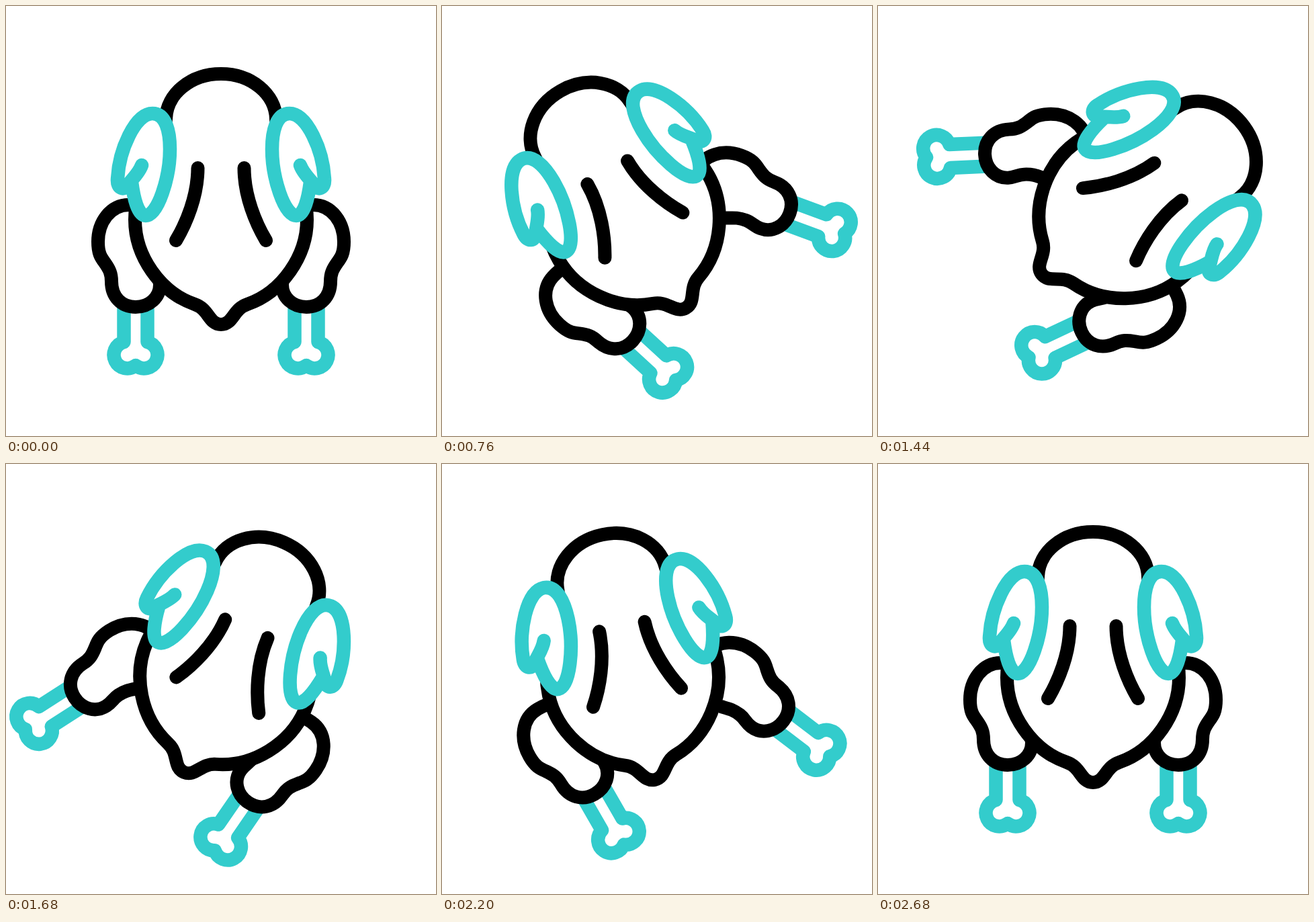
Recreate the animation shown at these times as an HTML page. Size 640 px wide and 640 px high, loop 3 s.

```html
<!DOCTYPE html>
<html lang="en">
<head>
<meta charset="utf-8">
<title>Dancing chicken</title>
<style>
  html, body { margin: 0; width: 100%; height: 100%; overflow: hidden; background: #fff; }
  svg { display: block; width: 100vw; height: 100vh; }
  path { fill: #fff; stroke: #000; stroke-width: 20; stroke-linecap: round; stroke-linejoin: round; }
  .teal { stroke: #33cccc; stroke-width: 20.5; }
  .line { fill: none; }
</style>
</head>
<body>
<svg viewBox="0 0 640 640">
  <defs>
    <g id="leg">
      <path class="teal" d="M175.5 445V500A20 20 0 1 0 193 535A20 20 0 1 0 210.5 500V445"/>
      <path d="M210 300C200 297 190 296 183 296C155 296 137 322 137 351C137 368 141 374 147 382C154 392 157 398 157 410C157 433 172 448 193 448C213 448 229 434 229 415C229 405 225 400 225 391C225 378 228 372 232 362"/>
    </g>
    <path id="wing" class="teal" d="M202 237C198 249 187 258 181 267C176 275 165 272 166 258C168 215 192 160 218 160C238 160 244 187 244 213C244 255 226 312 208 312C196 312 190 285 187 262"/>
    <path id="crease" class="line" d="M285.5 241C285.5 283 268 324 253 349"/>
  </defs>
  <g id="bird">
    <g id="legL"><use href="#leg"/></g>
    <g id="legR"><use href="#leg" transform="translate(640) scale(-1 1)"/></g>
    <path d="M320 101C275 101 239 131 238 168C236 220 192 250 192 318C192 372 229 426 281 444C302 451 302 474 320 474C338 474 338 451 359 444C411 426 448 372 448 318C448 250 404 220 402 168C401 131 365 101 320 101Z"/>
    <use href="#crease"/>
    <use href="#crease" transform="translate(640) scale(-1 1)"/>
    <use href="#wing"/>
    <use href="#wing" transform="translate(640) scale(-1 1)"/>
  </g>
</svg>
<script>
const LOOP = 3000, STEP = 40;
const el = id => document.getElementById(id);
const bird = el('bird'), legL = el('legL'), legR = el('legR');

// Rest, left, right, left, rest; the legs trail the body.
const BODY_TIMES = [200, 720, 1340, 2050, 2600];
const LEG_TIMES = [200, 680, 1600, 2080, 2680];

const ease = u => u * u * u * (u * (6 * u - 15) + 10);

// Eases through rest and the three swing poses back to rest.
function swing(times, left, right, leftAgain) {
  const poses = [0, left, right, leftAgain, 0];
  return t => {
    const i = times.findIndex(end => t < end);
    if (i < 1) return 0;
    const u = (t - times[i - 1]) / (times[i] - times[i - 1]);
    return poses[i - 1] + (poses[i] - poses[i - 1]) * ease(u);
  };
}

const tilt = swing(BODY_TIMES, -30.3, 55.4, -13.9);
const shift = swing(BODY_TIMES, -49, 74, -47.8);
const turnL = swing(LEG_TIMES, -17.7, 35.7, -19);
const turnR = swing(LEG_TIMES, -40, 13, -43);
const dropL = swing(LEG_TIMES, 38, 0, 40);
const dropR = swing(LEG_TIMES, 0, 35, 0);

function place(node, x, y, angle, pivot) {
  node.setAttribute('transform', `translate(${x} ${y}) rotate(${angle} ${pivot})`);
}

function draw(t) {
  place(bird, shift(t), 0, tilt(t), '320 291');
  place(legL, 0, dropL(t), turnL(t), '180 332');
  place(legR, 0, dropR(t), turnR(t), '460 332');
}

const start = performance.now();
function tick(now) {
  const t = Math.max(0, now - start) % LOOP;
  draw(Math.floor(t / STEP) * STEP);
  requestAnimationFrame(tick);
}
draw(0);
requestAnimationFrame(tick);
</script>
</body>
</html>
```
